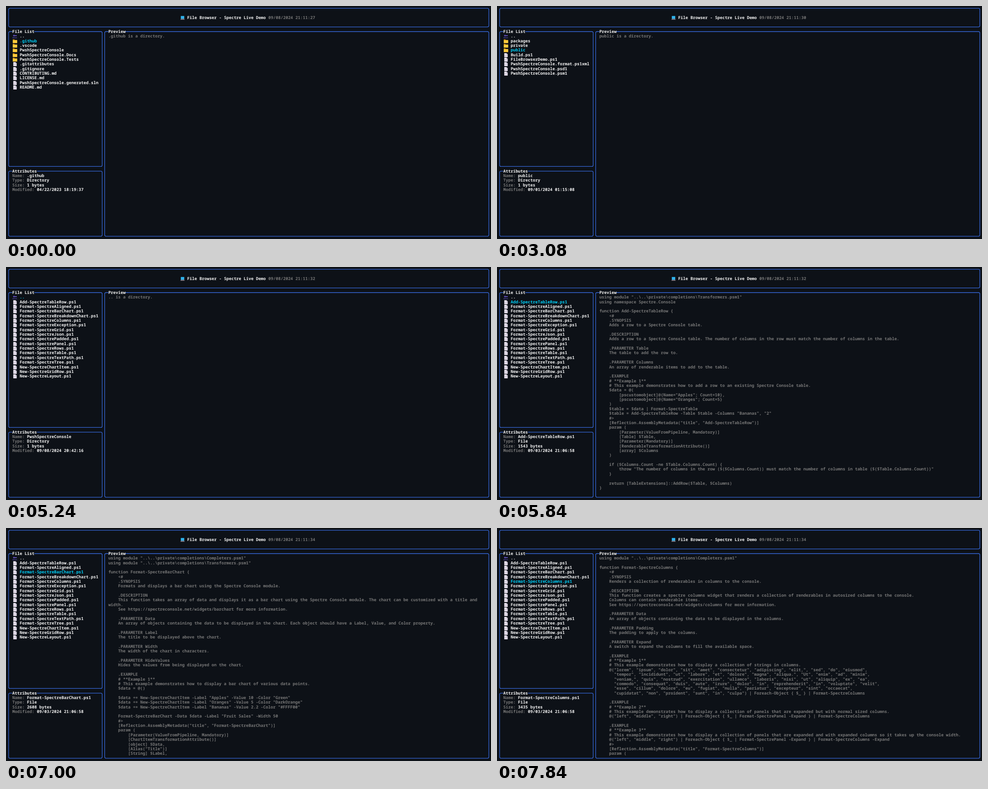
Animation, 1080 px wide and 519 px high, one loop 8 s. Source, as an HTML page:

```html
<!DOCTYPE html>
<html lang="en">
<head>
<meta charset="utf-8">
<title>File Browser</title>
<style>
html, body { margin: 0; width: 100%; height: 100%; overflow: hidden; background: #0d1117; }
body { position: relative; }
svg, pre { position: absolute; margin: 0; }
pre {
  font: 600 9.14px/10.36px "Noto Sans Mono", "DejaVu Sans Mono", monospace;
  text-rendering: geometricPrecision; font-variant-ligatures: none;
  white-space: pre; color: #f2f2f2;
}
.head { background: #0d1117; }
.dim { color: #767676; }
.sel { color: #00d0f8; }
#frame { left: 0; top: 0; fill: none; stroke: #3769dc; stroke-width: 1.3; }
</style>
</head>
<body>
<svg width="0" height="0">
  <symbol id="back" viewBox="0 0 11 10.36">
    <path d="M1.2 3.9 4.4 1.2V3H10V4.9H4.4V6.6Z" fill="#5f4fb8"/>
    <text x="5.7" y="9.8" font-family="Inter, sans-serif" font-size="3.6" font-weight="700" text-anchor="middle" fill="#5f4fb8">BACK</text>
  </symbol>
  <symbol id="folder" viewBox="0 0 11 10.36">
    <path d="M1 2.2Q1 1.6 1.6 1.6H4.4L5.6 2.8H10.2Q10.8 2.8 10.8 3.4V9Q10.8 9.5 10.2 9.5H1.6Q1 9.5 1 9Z" fill="#f0a91c"/>
    <path d="M1 4H4.6L5.6 3.2H10.8V9Q10.8 9.5 10.2 9.5H1.6Q1 9.5 1 9Z" fill="#ffcb3d"/>
  </symbol>
  <symbol id="file" viewBox="0 0 11 10.36">
    <path d="M2.2 1H7.3L9.8 3.5V9.9H2.2Z" fill="#ebe5f0"/>
    <path d="M7.3 1V3.5H9.8Z" fill="#9a92a8"/>
    <path d="M3.4 4.6H8.5M3.4 6.2H8.5M3.4 7.8H8.5" stroke="#b9b0c4" stroke-width=".6"/>
  </symbol>
  <symbol id="laptop" viewBox="0 0 11 10.36">
    <path d="M2.3 1.2H9.9V7.6H2.3Z" fill="#2fb4ee"/>
    <path d="M2.3 7.6H9.9L10.8 9.6H1.3Z" fill="#8f8a96"/>
  </symbol>
</svg>
<svg id="frame" width="1080" height="519"></svg>
<script>
const CW = 5.484, RH = 10.36, X0 = 3.05;
const colX = c => X0 + c * CW;

const LISTS = {
  root: [".github .vscode PwshSpectreConsole PwshSpectreConsole.Docs PwshSpectreConsole.Tests",
    ".gitattributes .gitignore CONTRIBUTING.md LICENSE.md PwshSpectreConsole.generated.sln README.md"],
  module: ["packages private public",
    "Build.ps1 FileBrowserDemo.ps1 PwshSpectreConsole.format.ps1xml PwshSpectreConsole.psd1 PwshSpectreConsole.psm1"],
  public: ["config demo formatting images live progress prompts writing", ""],
  formatting: ["", "Add-SpectreTableRow " +
    "Aligned BarChart BreakdownChart Columns Exception Grid Json Padded Panel Rows Table TextPath Tree"
      .replace(/\w+/g, "Format-Spectre$&") +
    " New-SpectreChartItem New-SpectreGridRow New-SpectreLayout"],
};
LISTS.formatting[1] = LISTS.formatting[1].replace(/\S+/g, "$&.ps1");

const COMPLETERS = String.raw`using module "..\..\private\completions\Completers.psm1"` + "\n";
const TRANSFORMERS = String.raw`using module "..\..\private\completions\Transformers.psm1"` + "\n";

const TABLE_ROW = TRANSFORMERS + String.raw`using namespace Spectre.Console

function Add-SpectreTableRow {
    <#
    .SYNOPSIS
    Adds a row to a Spectre Console table.

    .DESCRIPTION
    Adds a row to a Spectre Console table. The number of columns in the row must match the number of columns in the table.

    .PARAMETER Table
    The table to add the row to.

    .PARAMETER Columns
    An array of renderable items to add to the table.

    .EXAMPLE
    # **Example 1**
    # This example demonstrates how to add a row to an existing Spectre Console table.
    $data = @(
        [pscustomobject]@{Name="Apples"; Count=10},
        [pscustomobject]@{Name="Oranges"; Count=5}
    )
    $table = $data | Format-SpectreTable
    $table = Add-SpectreTableRow -Table $table -Columns "Bananas", "2"
    #>
    [Reflection.AssemblyMetadata("title", "Add-SpectreTableRow")]
    param (
        [Parameter(ValueFromPipeline, Mandatory)]
        [Table] $Table,
        [Parameter(Mandatory)]
        [RenderableTransformationAttribute()]
        [array] $Columns
    )

    if ($Columns.Count -ne $Table.Columns.Count) {
        throw "The number of columns in the row ($($Columns.Count)) must match the number of columns in table ($($Table.Columns.Count))"
    }

    return [TableExtensions]::AddRow($Table, $Columns)
}`;

const ALIGNED = COMPLETERS + TRANSFORMERS + String.raw`
function Format-SpectreAligned {
    <#
    .SYNOPSIS
    Wraps a renderable object in a Spectre Console Aligned object.

    .DESCRIPTION
    This wraps a renderable object in a Spectre Console Aligned object. This allows you to align the object horizontally and vertically within a space.
Aligned objects are always expanded so they take up all available horizontal space.

    .PARAMETER Data
    The renderable object to align.

    .PARAMETER HorizontalAlignment
    The horizontal alignment of the object.

    .PARAMETER VerticalAlignment
    The vertical alignment of the object.

    .EXAMPLE
    # **Example 1**
    # This example demonstrates how to align a string to the right inside a panel.
    "hello right hand side" | Format-SpectreAligned -HorizontalAlignment Right -VerticalAlignment Middle | Format-SpectrePanel -Expand -Height 9
    #>
    [Reflection.AssemblyMetadata("title", "Format-SpectreAligned")]
    param(
        [Parameter(ValueFromPipeline, Mandatory)]
        [RenderableTransformationAttribute()]
        [object] $Data,
        [ValidateSet([SpectreConsoleHorizontalAlignment], ErrorMessage = "Value '{0}' is invalid. Try one of: {1}")]
        [string] $HorizontalAlignment = "Center",
        [ValidateSet([SpectreConsoleVerticalAlignment], ErrorMessage = "Value '{0}' is invalid. Try one of: {1}")]
        [string] $VerticalAlignment = "Middle"
    )

    $aligned = [Spectre.Console.Align]::new(
        $Data,
        [Spectre.Console.HorizontalAlignment]::$HorizontalAlignment,
        [Spectre.Console.VerticalAlignment]::$VerticalAlignment
    )`;

const BAR_CHART = COMPLETERS + TRANSFORMERS + String.raw`
function Format-SpectreBarChart {
    <#
    .SYNOPSIS
    Formats and displays a bar chart using the Spectre Console module.

    .DESCRIPTION
    This function takes an array of data and displays it as a bar chart using the Spectre Console module. The chart can be customized with a title and
width.
    See https://spectreconsole.net/widgets/barchart for more information.

    .PARAMETER Data
    An array of objects containing the data to be displayed in the chart. Each object should have a Label, Value, and Color property.

    .PARAMETER Label
    The title to be displayed above the chart.

    .PARAMETER Width
    The width of the chart in characters.

    .PARAMETER HideValues
    Hides the values from being displayed on the chart.

    .EXAMPLE
    # **Example 1**
    # This example demonstrates how to display a bar chart of various data points.
    $data = @()

    $data += New-SpectreChartItem -Label "Apples" -Value 10 -Color "Green"
    $data += New-SpectreChartItem -Label "Oranges" -Value 5 -Color "DarkOrange"
    $data += New-SpectreChartItem -Label "Bananas" -Value 2.2 -Color "#FFFF00"

    Format-SpectreBarChart -Data $data -Label "Fruit Sales" -Width 50
    #>
    [Reflection.AssemblyMetadata("title", "Format-SpectreBarChart")]
    param (
        [Parameter(ValueFromPipeline, Mandatory)]
        [ChartItemTransformationAttribute()]
        [object] $Data,
        [Alias("Title")]
        [String] $Label,`;

const BREAKDOWN = COMPLETERS + TRANSFORMERS + String.raw`
function Format-SpectreBreakdownChart {
    <#
    .SYNOPSIS
    Formats data into a breakdown chart.

    .DESCRIPTION
    This function takes an array of data and formats it into a breakdown chart using Spectre.Console.BreakdownChart. The chart can be customized with a
specified width and color.
    See https://spectreconsole.net/widgets/breakdownchart for more information.

    .PARAMETER Data
    An array of objects containing the data to be displayed in the chart. Each object should have a Label, Value, and Color property.

    .PARAMETER Width
    The width of the chart. Defaults to the width of the console.

    .PARAMETER HideTags
    Hides the tags on the chart.

    .PARAMETER HideTagValues
    Hides the tag values on the chart.

    .EXAMPLE
    # **Example 1**
    # This example demonstrates how to display a breakdown chart of various data points.
    $data = @()

    $data += New-SpectreChartItem -Label "Apples" -Value 10 -Color "Green"
    $data += New-SpectreChartItem -Label "Oranges" -Value 5 -Color "Gold1"
    $data += New-SpectreChartItem -Label "Bananas" -Value 2.2 -Color "#FFFF00"

    Format-SpectreBreakdownChart -Data $data -Width 50
    #>
    [Reflection.AssemblyMetadata("title", "Format-SpectreBreakdownChart")]
    param (
        [Parameter(ValueFromPipeline, Mandatory)]
        [ChartItemTransformationAttribute()]
        [object] $Data,
        [ValidateScript({ $_ -gt 0 -and $_ -le (Get-HostWidth) }, ErrorMessage = "Value '{0}' is invalid. Cannot be negative or exceed console width.")]
        [int] $Width = (Get-HostWidth),`;

const COLUMNS = COMPLETERS + String.raw`
function Format-SpectreColumns {
    <#
    .SYNOPSIS
    Renders a collection of renderables in columns to the console.

    .DESCRIPTION
    This function creates a spectre columns widget that renders a collection of renderables in autosized columns to the console.
    Columns can contain renderable items.
    See https://spectreconsole.net/widgets/columns for more information.

    .PARAMETER Data
    An array of objects containing the data to be displayed in the columns.

    .PARAMETER Padding
    The padding to apply to the columns.

    .PARAMETER Expand
    A switch to expand the columns to fill the available space.

    .EXAMPLE
    # **Example 1**
    # This example demonstrates how to display a collection of strings in columns.
    @("lorem", "ipsum", "dolor", "sit", "amet", "consectetur", "adipiscing", "elit,", "sed", "do", "eiusmod",
      "tempor", "incididunt", "ut", "labore", "et", "dolore", "magna", "aliqua.", "Ut", "enim", "ad", "minim",
      "veniam,", "quis", "nostrud", "exercitation", "ullamco", "laboris", "nisi", "ut", "aliquip", "ex", "ea",
      "commodo", "consequat", "duis", "aute", "irure", "dolor", "in", "reprehenderit", "in", "voluptate", "velit",
      "esse", "cillum", "dolore", "eu", "fugiat", "nulla", "pariatur", "excepteur", "sint", "occaecat",
      "cupidatat", "non", "proident", "sunt", "in", "culpa") | Foreach-Object { $_ } | Format-SpectreColumns

    .EXAMPLE
    # **Example 2**
    # This example demonstrates how to display a collection of panels that are expanded but with normal sized columns.
    @("left", "middle", "right") | Foreach-Object { $_ | Format-SpectrePanel -Expand } | Format-SpectreColumns

    .EXAMPLE
    # **Example 3**
    # This example demonstrates how to display a collection of panels that are expanded and with expanded columns so it takes up the console width.
    @("left", "middle", "right") | Foreach-Object { $_ | Format-SpectrePanel -Expand } | Format-SpectreColumns -Expand
    #>
    [Reflection.AssemblyMetadata("title", "Format-SpectreColumns")]
    param (`;

// start ms, list, selected row, modified, size, file text
const UP = "09/08/2024 20:42:16", EDIT = "09/03/2024 21:06:58";
const STEPS = [
  [0, "root", 1, "04/22/2023 18:19:37"],
  [480, "root", 2, "09/01/2024 01:15:06"],
  [880, "root", 3, "09/08/2024 20:46:38"],
  [2000, "module", 0, UP],
  [2400, "module", 1, "09/01/2024 01:22:45"],
  [2800, "module", 2, "09/03/2024 21:06:57"],
  [3080, "module", 3, "09/01/2024 01:15:08"],
  [3480, "public", 0, UP],
  [4120, "public", 1, "09/03/2024 21:06:59"],
  [4320, "public", 2, "09/01/2024 01:15:07"],
  [4800, "public", 3, EDIT],
  [5240, "formatting", 0, UP],
  [5840, "formatting", 1, EDIT, 1543, TABLE_ROW],
  [6320, "formatting", 2, EDIT, 1738, ALIGNED],
  [7000, "formatting", 3, EDIT, 2608, BAR_CHART],
  [7400, "formatting", 4, EDIT, 2627, BREAKDOWN],
  [7840, "formatting", 5, EDIT, 3435, COLUMNS],
];
const TICKS = [1080, 2000, 3080, 3920, 5000, 6080, 7000];

function put(col, row, text = "", cls = "") {
  const el = document.createElement("pre");
  el.className = cls;
  el.style.left = colX(col) + "px";
  el.style.top = row * RH + "px";
  el.textContent = text;
  document.body.append(el);
  return el;
}

function panel(c0, r0, c1, r1, title) {
  frame.innerHTML += `<rect x="${colX(c0 + .5)}" y="${(r0 + .5) * RH}" width="${(c1 - c0) * CW}" height="${(r1 - r0) * RH}" rx="3"/>`;
  if (title) put(c0 + 2, r0, title, "head");
}

const icon = (id, x, y) =>
  `<svg style="left:${x}px;top:${y}px" width="11" height="10.36"><use href="#${id}"/></svg>`;

const frame = document.getElementById("frame");
panel(0, 0, 195, 4);
panel(0, 5, 38, 34, "File List");
panel(0, 35, 38, 49, "Attributes");
panel(39, 5, 195, 49, "Preview");
document.body.insertAdjacentHTML("beforeend", icon("laptop", colX(70), 2 * RH));
put(73, 2, "File Browser - Spectre Live Demo");
const clock = put(106, 2, "", "dim");
const list = put(5, 6);
const attrs = put(2, 36);
const preview = put(41, 6, "", "dim");

function show([, key, sel, modified, size, text]) {
  const [dirs, files] = LISTS[key].map(s => s.split(" ").filter(Boolean));
  const names = ["..", ...dirs, ...files];
  list.innerHTML = names.map((name, i) => {
    const id = i === 0 ? "back" : i <= dirs.length ? "folder" : "file";
    return icon(id, -3 * CW, i * RH) + `<span class="${i === sel ? "sel" : ""}">${name}</span>`;
  }).join("\n");

  const name = sel ? names[sel] : "PwshSpectreConsole";
  const fields = [["Name", name], ["Type", text ? "File" : "Directory"],
    ["Size", (size || 1) + " bytes"], ["Modified", modified]];
  attrs.innerHTML = fields.map(([label, value]) =>
    `<span class="dim">${label}:</span>${value.length > 29 ? "\n" : " "}${value}`).join("\n");
  preview.textContent = text || names[sel] + " is a directory.";
}

let shown;
function draw(now) {
  const t = now % 8000;
  const step = STEPS.findLast(s => s[0] <= t);
  if (step !== shown) show(shown = step);
  clock.textContent = "09/08/2024 21:11:" + (27 + TICKS.filter(k => k <= t).length);
}

const start = performance.now();
function loop() {
  draw(performance.now() - start);
  requestAnimationFrame(loop);
}
loop();
</script>
</body>
</html>
```
